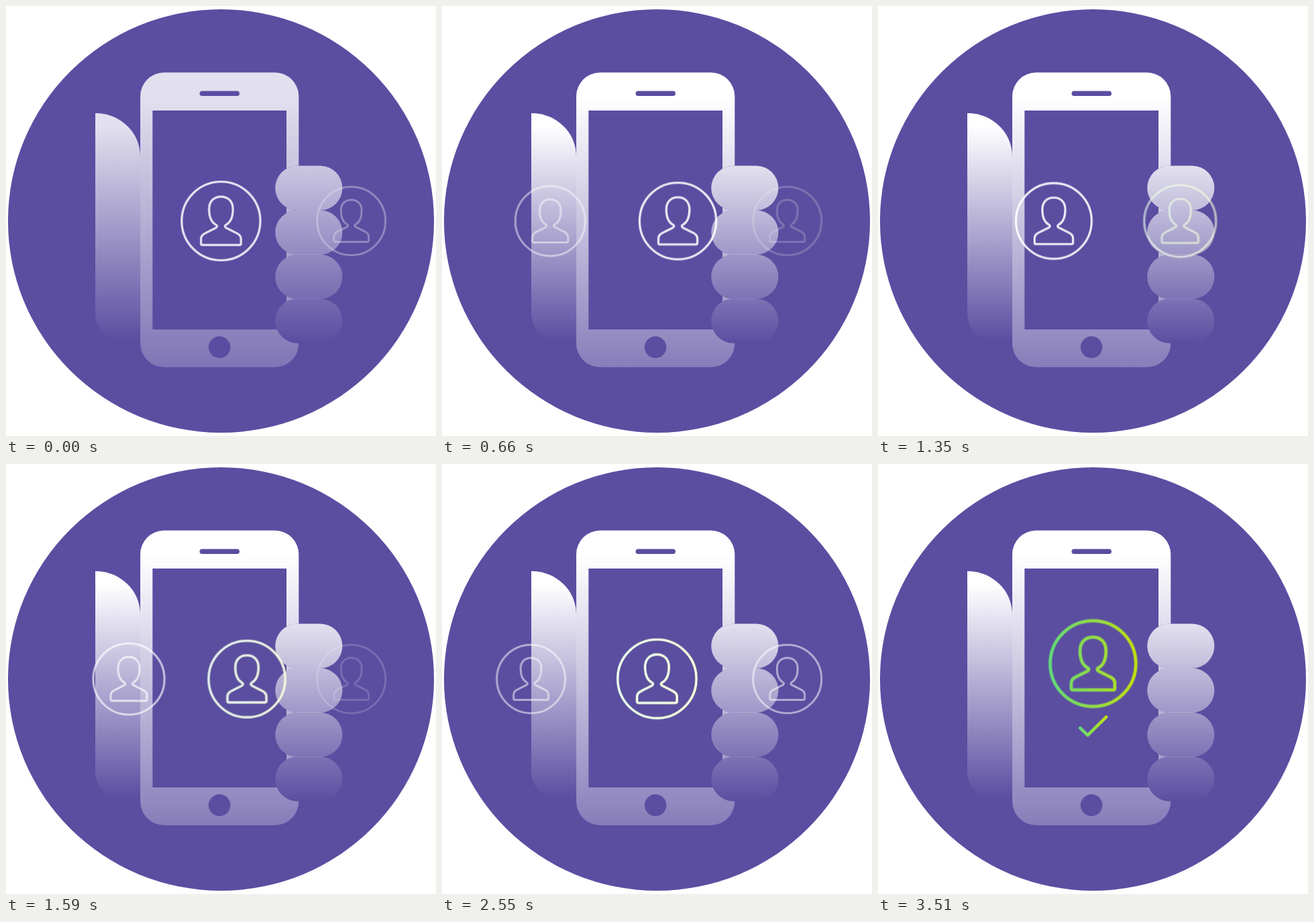
An HTML page for the animation above (4710 ms loop, 650 px wide and 650 px high).

```html
<!DOCTYPE html>
<html lang="en">
<head>
<meta charset="utf-8">
<title>Choosing a contact</title>
<style>
  html, body { margin: 0; width: 100%; height: 100%; overflow: hidden; background: #fff; }
  svg { display: block; width: 100vw; height: 100vh; }

  .scene, .icon, .white, .check, .spark {
    animation: 4710ms linear infinite;
  }
  .scene { animation-name: appear; }
  .icon {
    fill: none; stroke: #fff; stroke-width: 3.4px; stroke-linejoin: round;
    animation-timing-function: cubic-bezier(.37, 0, .63, 1);
    --left: translate(134.5px, 325px) scale(.87);
    --mid: translate(325px, 325px);
    --right: translate(522px, 325px) scale(.87);
  }
  .first { animation-name: first; }
  .second { animation-name: second; }
  .chosen { animation-name: chosen; }
  .last { animation-name: last; }
  .white { animation-name: tint; }
  .check { animation-name: check; }
  .spark {
    animation-name: fly, twinkle;
    fill: none; stroke-width: 5px; stroke-linecap: round;
  }

  @keyframes appear { 0% { opacity: .83; } 3.5%, 100% { opacity: 1; } }

  @keyframes first {
    0% { transform: var(--mid); opacity: 1; }
    18.9%, 22.29% { transform: var(--left); opacity: .4; }
    29.72%, 100% { transform: var(--left); opacity: 0; }
  }
  @keyframes second {
    0% { transform: var(--right); opacity: .4; }
    19.75%, 22.29% { transform: translate(317.5px, 325px) scale(1); opacity: 1; }
    40.13%, 53.5% { transform: var(--left); opacity: .55; }
    63.69%, 100% { transform: var(--left); opacity: 0; }
  }
  @keyframes chosen {
    0%, 8.28% { transform: var(--right); opacity: 0; }
    19.75%, 22.29% { transform: var(--right); opacity: .4; }
    38.6%, 53.5% { transform: translate(325px, 325px) scale(1); opacity: 1; stroke-width: 3.4px; }
    62.4%, 100% { transform: translate(325px, 301.8px) scale(1.09); opacity: 1; stroke-width: 4.55px; }
  }
  @keyframes last {
    0%, 30.15% { transform: var(--right); opacity: 0; }
    39.49%, 53.5% { transform: var(--right); opacity: .55; }
    63.69%, 100% { transform: var(--right); opacity: 0; }
  }
  @keyframes tint { 0%, 53.5% { opacity: 1; } 61.5%, 100% { opacity: 0; } }
  @keyframes check { 0%, 62.4% { opacity: 0; } 66.2%, 100% { opacity: 1; } }
  @keyframes fly {
    0%, 60.51% { translate: var(--from); }
    73.25%, 100% { translate: var(--to); }
  }
  @keyframes twinkle {
    0%, 60.51% { opacity: 0; scale: .3; }
    63% { opacity: 1; }
    64.3% { scale: 1; }
    69% { opacity: 1; scale: .9; }
    73.25%, 100% { opacity: 0; scale: .5; }
  }
</style>
</head>
<body>
<svg viewBox="0 0 650 650">
  <defs>
    <linearGradient id="phoneFill" gradientUnits="userSpaceOnUse" x1="0" y1="140" x2="0" y2="546">
      <stop stop-color="#fff"/><stop offset="1" stop-color="#fff" stop-opacity=".27"/>
    </linearGradient>
    <linearGradient id="thumbFill" gradientUnits="userSpaceOnUse" x1="0" y1="182" x2="0" y2="507">
      <stop stop-color="#fff"/><stop offset="1" stop-color="#fff" stop-opacity="0"/>
    </linearGradient>
    <linearGradient id="fingerFill" gradientUnits="userSpaceOnUse" x1="0" y1="241" x2="0" y2="510">
      <stop stop-color="#fff" stop-opacity=".83"/><stop offset="1" stop-color="#fff" stop-opacity="0"/>
    </linearGradient>
    <linearGradient id="lime" gradientUnits="userSpaceOnUse" x1="-62" x2="62" y1="0" y2="0">
      <stop stop-color="#5fdb7c"/><stop offset="1" stop-color="#c3e00f"/>
    </linearGradient>
    <linearGradient id="limeCheck" href="#lime" x1="303" x2="347"/>
    <linearGradient id="limePlus" href="#lime" x1="-12" x2="12"/>
    <linearGradient id="limeBack" href="#lime" x1="12" x2="-12"/>

    <g id="user">
      <circle r="59.4"/>
      <path d="M0-36.8C11-36.8 18-29.5 18-18C18-5 14 2 8 5.5Q6 6.5 6 8Q6 9.5 8 10.5L22 17.5Q30.2 21 30.2 27V34Q30.2 36.3 27.8 36.3H-27.8Q-30.2 36.3-30.2 34V27Q-30.2 21-22 17.5L-8 10.5Q-6 9.5-6 8Q-6 6.5-8 5.5C-14 2-18-5-18-18C-18-29.5-11-36.8 0-36.8Z"/>
    </g>
    <g id="fingers">
      <rect x="407" y="241.5" width="101.5" height="67.3" rx="33.6"/>
      <rect x="407" y="308.6" width="101.5" height="67.3" rx="33.6"/>
      <rect x="407" y="375.6" width="101.5" height="67.3" rx="33.6"/>
      <rect x="407" y="442.4" width="101.5" height="67.3" rx="33.6"/>
    </g>
    <path id="plus" d="M-10 0H10M0-10V10"/>
  </defs>

  <ellipse cx="325" cy="325" rx="322" ry="320" fill="#5b4ea1"/>

  <g class="scene">
    <path d="M135 162C173 162 203 191 203 228V509H180C155 509 135 489 135 464Z" fill="url(#thumbFill)"/>
    <rect x="203" y="100.5" width="239.5" height="445.5" rx="36" fill="url(#phoneFill)"/>
    <g fill="#5b4ea1">
      <rect x="221.5" y="158" width="202.5" height="331"/>
      <rect x="292.7" y="128.5" width="60.3" height="7.6" rx="3.8"/>
      <circle cx="322.7" cy="515.8" r="16.5"/>
      <use href="#fingers"/>
    </g>
    <use href="#fingers" fill="url(#fingerFill)"/>

    <g class="icon first"><use href="#user"/></g>
    <g class="icon second"><use href="#user"/></g>
    <g class="icon last"><use href="#user"/></g>
    <g class="icon chosen">
      <use href="#user" stroke="url(#lime)"/>
      <use class="white" href="#user"/>
    </g>
  </g>

  <path class="check" d="M305.5 399L317 410L345 382.3" fill="none" stroke="url(#limeCheck)"
    stroke-width="4.6" stroke-linecap="round" stroke-linejoin="round"/>

  <g class="spark" style="--from:426.4px 100.4px; --to:435px 99px">
    <path d="M0-7Q1.6-1.6 6 0Q1.6 1.6 0 7Q-1.6 1.6-6 0Q-1.6-1.6 0-7Z" fill="#7edc5c"/>
  </g>
  <g class="spark" style="--from:448.3px 136.3px; --to:474px 112px">
    <use href="#plus" stroke="url(#limePlus)"/>
  </g>
  <g class="spark" style="--from:444.4px 178.6px; --to:503px 160px; rotate:-16deg">
    <use href="#plus" stroke="url(#limeBack)"/>
  </g>
  <g class="spark" style="--from:207.7px 514.6px; --to:162px 526px; rotate:-16deg">
    <use href="#plus" stroke="url(#limeBack)"/>
  </g>
</svg>
</body>
</html>
```
